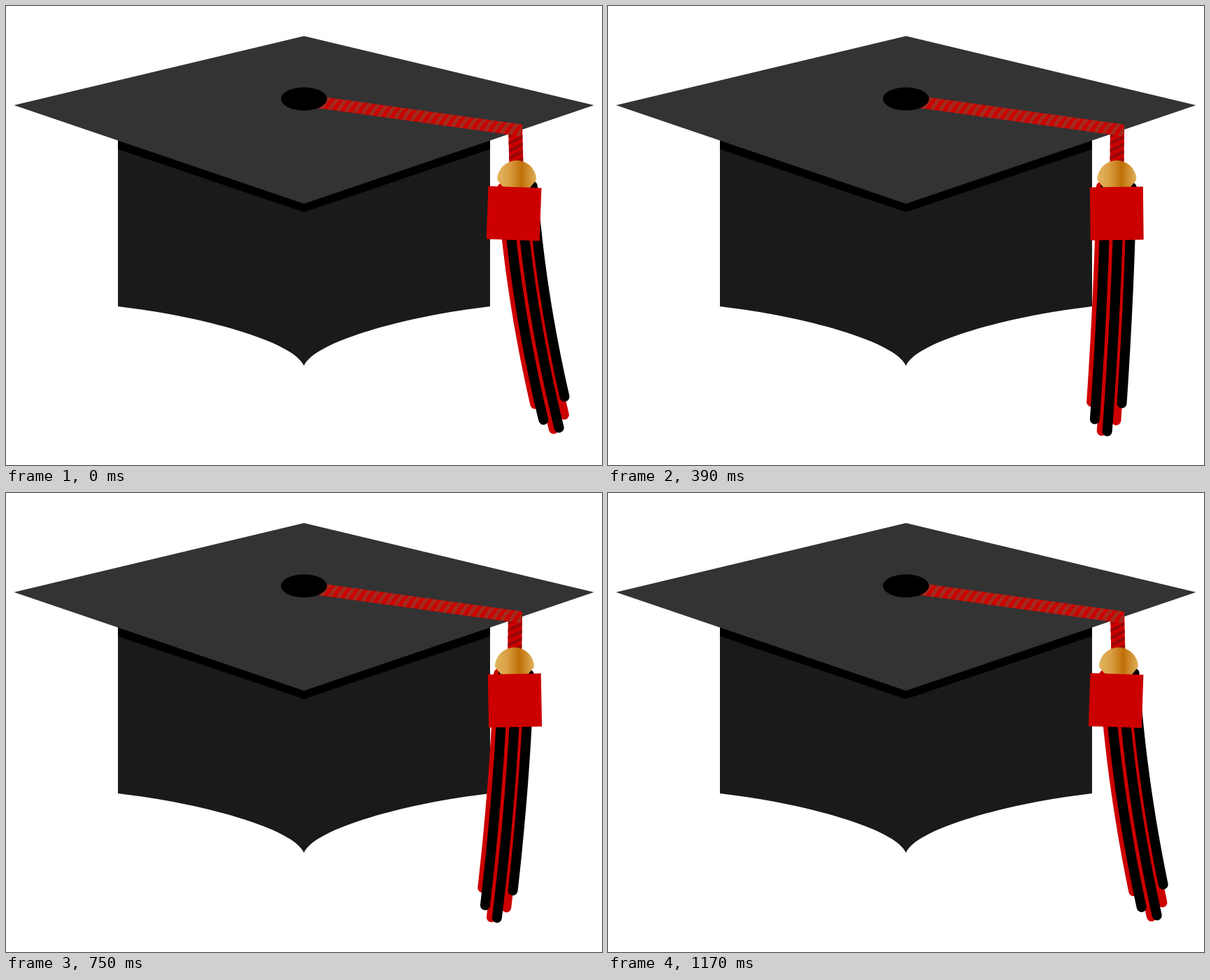
Animation, 852 px wide and 657 px high, one loop 1.2 s. Source, as an HTML page with a canvas:

```html
<!DOCTYPE html>
<html lang="en">
<head>
<meta charset="utf-8">
<title>Graduation cap</title>
<style>
  html, body { margin: 0; width: 100%; height: 100%; overflow: hidden; background: #fff; }
  canvas { display: block; }
</style>
</head>
<body>
<canvas id="stage" width="852" height="657"></canvas>
<script>
const ctx = document.getElementById('stage').getContext('2d');
const RED = '#cc0000', BLACK = '#000';
const STEP = 30, STEPS = 40;
const AXIS = 728, PIVOT = 170, LENGTH = 440, SWING = 59.5, BEND = 1.8;

// [distance from the axis, y of the tip, colour], back to front
const strands = [
  [-22, 568.5, RED], [-4.5, 609, RED], [15, 592.5, RED],
  [-15.5, 593, BLACK], [3.5, 609, BLACK], [21.5, 567.5, BLACK]
];

// Point of the hanging cord at side distance d and rest height y, for swing k in -1..1
function bend(d, y, k) {
  const u = Math.max(0, (y - PIVOT) / LENGTH);
  const angle = Math.atan(k * SWING * BEND / LENGTH * u ** (BEND - 1));
  return [
    AXIS + k * SWING * u ** BEND + d * Math.cos(angle),
    y - 4.5 * k * k * u ** 2.6 - d * Math.sin(angle)
  ];
}

function trace(points) {
  ctx.beginPath();
  points.forEach(([x, y]) => ctx.lineTo(x, y));
}

function poly(color, points) {
  trace(points);
  ctx.closePath();
  ctx.fillStyle = color;
  ctx.fill();
}

function line(color, width, points, cap = 'butt') {
  trace(points);
  ctx.strokeStyle = color;
  ctx.lineWidth = width;
  ctx.lineCap = cap;
  ctx.stroke();
}

function drawCap() {
  ctx.beginPath();
  ctx.moveTo(160, 190);
  ctx.lineTo(160, 430);
  ctx.bezierCurveTo(280, 444, 411, 480, 426, 515);
  ctx.bezierCurveTo(441, 480, 572, 444, 692, 430);
  ctx.lineTo(692, 190);
  ctx.fillStyle = '#1a1a1a';
  ctx.fill();
  poly(BLACK, [[160, 190], [692, 190], [692, 205], [426, 295], [160, 205]]);
  poly('#333', [[11.5, 142], [426, 43], [840.5, 142], [426, 283]]);
}

function drawStrands(k) {
  for (const [d, tip, color] of strands) {
    const points = [];
    for (let i = 0; i <= 30; i++) points.push(bend(d, 259 + (tip - 259) * i / 30, k));
    line(color, 14, points, 'round');
  }
}

function drawDrop(k) {
  const edge = [[-10, 172], [10, 172], [10, 226], [-10, 226]].map(([d, y]) => bend(d, y, k));
  ctx.save();
  poly(RED, edge);
  ctx.clip();
  for (let y = 181; y < 235; y += 10.5) {
    line('#990808', 4.5, [bend(-12, y + 6, k), bend(12, y - 5, k)]);
  }
  ctx.restore();
}

function drawRope() {
  ctx.save();
  ctx.translate(455, 138.8);
  ctx.rotate(0.138);
  ctx.beginPath();
  ctx.roundRect(-12, -8.5, 297, 17, [0, 3, 0, 0]);
  ctx.fillStyle = RED;
  ctx.fill();
  ctx.clip();
  ctx.strokeStyle = '#a32a1e';
  ctx.lineWidth = 5.5;
  for (let x = 2; x < 290; x += 11.8) {
    ctx.beginPath();
    ctx.moveTo(x - 5, 10);
    ctx.quadraticCurveTo(x - 1, -3, x + 6, -10);
    ctx.stroke();
  }
  ctx.restore();
}

function drawBead(k) {
  const x = bend(0, 240, k)[0];
  const gold = ctx.createLinearGradient(x - 28, 0, x + 28, 0);
  gold.addColorStop(0, '#e3b55f');
  gold.addColorStop(0.3, '#d9a043');
  gold.addColorStop(0.62, '#bf6f08');
  gold.addColorStop(1, '#e0b05a');
  ctx.beginPath();
  ctx.arc(x, 249, 28, Math.PI, 0);
  ctx.lineTo(x + 18, 261);
  ctx.lineTo(x - 18, 261);
  ctx.fillStyle = gold;
  ctx.fill();
}

function drawBadge(k) {
  ctx.save();
  ctx.translate(727, 272);
  ctx.rotate(k * 0.036);
  ctx.fillStyle = RED;
  ctx.fillRect(-38, -13, 76, 76);
  ctx.restore();
}

function draw(k) {
  ctx.fillStyle = '#fff';
  ctx.fillRect(0, 0, 852, 657);
  drawCap();
  drawStrands(k);
  drawDrop(k);
  drawRope();
  drawBead(k);
  drawBadge(k);
  ctx.beginPath();
  ctx.ellipse(426, 133, 33, 16.5, 0, 0, 2 * Math.PI);
  ctx.fillStyle = BLACK;
  ctx.fill();
}

const start = performance.now();
function tick() {
  const step = Math.floor(Math.max(0, performance.now() - start) / STEP) % STEPS;
  draw(Math.abs(step - 20) / 10 - 1);
  requestAnimationFrame(tick);
}
tick();
</script>
</body>
</html>
```
